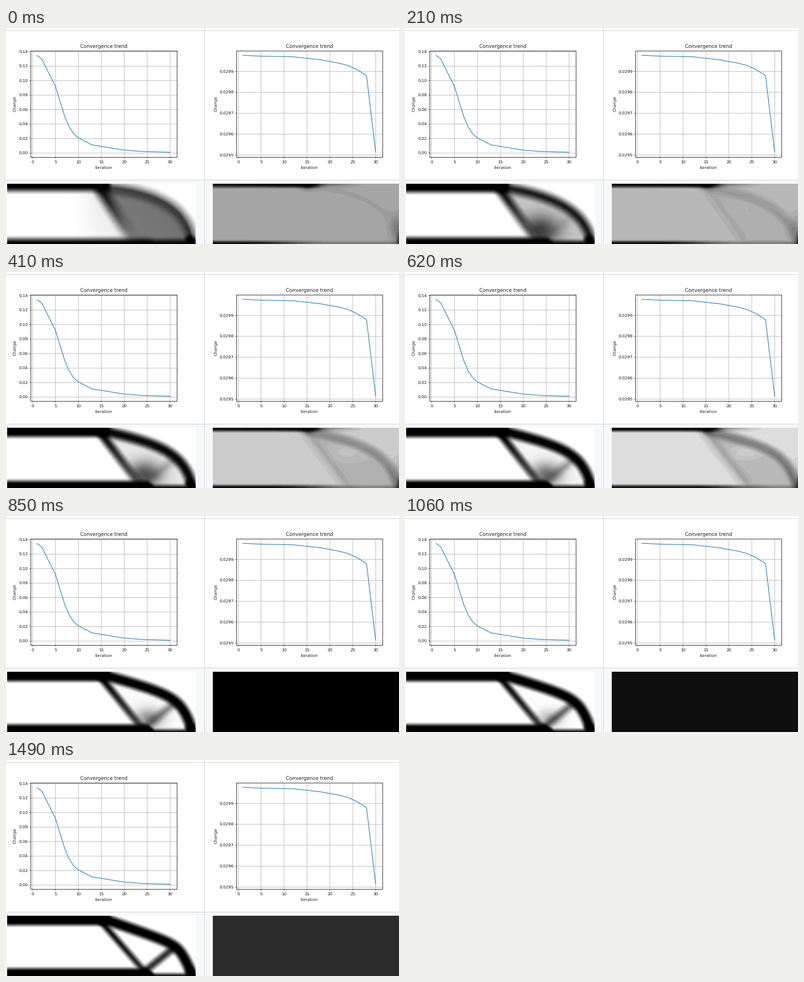
Animation of 688x380 px, one loop 1.59 s. Source, as a matplotlib script:

```python
import numpy as np
import matplotlib.pyplot as plt
from matplotlib.animation import FuncAnimation
from matplotlib.collections import LineCollection
from matplotlib.patches import Rectangle

W, H, DPI = 688, 380, 64
LOOP, STEP = 1590, 10
STARTS = [0, 210, 410, 620, 850, 1060, 1280, 1490]
LAST = len(STARTS) - 1
PX = 72 / DPI  # points per pixel

plt.rcParams["font.family"] = "DejaVu Sans"
plt.rcParams["text.hinting"] = "none"

fig = plt.figure(figsize=(W / DPI, H / DPI), dpi=DPI, facecolor="white")
ax = fig.add_axes([0, 0, 1, 1])
ax.axis("off")


# ---------- charts ----------
def segments(lines, color, width=1.0, z=2):
    ax.add_collection(LineCollection(lines, colors=color, linewidths=width * PX,
                                     zorder=z, snap=False))


def label(x, y, text, size=7.2, **kw):
    kw = {"ha": "center", "va": "baseline", **kw}
    ax.text(x, y, text, fontsize=size * PX, color="#1c1c1c", zorder=5, **kw)


def chart(left, name_x, y_ticks, y_fmt, y_px, keys):
    top, right, bottom = 40.5, left + 256, 227.5
    x_px = lambda i: left + 2.95 + 8.025 * i
    grid, ticks = [], []
    for i in range(0, 31, 5):
        x = x_px(i)
        grid.append([(x, top), (x, bottom)])
        ticks.append([(x, bottom), (x, bottom + 2.5)])
        label(x, 238, str(i))
    for v in y_ticks:
        y = y_px(v)
        grid.append([(left, y), (right, y)])
        ticks.append([(left - 2.5, y), (left, y)])
        label(left - 4.9, y + 2.2, y_fmt.format(v), ha="right")
    segments(grid, "#c0c0c0")
    segments(ticks, "#505050", 0.8, 4)
    frame = [(left, top), (right, top), (right, bottom), (left, bottom), (left, top)]
    segments([frame], "#404040", 1, 4)
    its = np.arange(1, 31)
    ax.plot(x_px(its), y_px(np.interp(its, *zip(*keys))), color="#1f77b4",
            lw=1.05 * PX, zorder=3)
    label(left + 127.5, 35.6, "Convergence trend", 8.6)
    label(left + 127.5, 248, "Iteration")
    label(name_x, 133.5, "Change", rotation=90, va="center")


ax.add_patch(Rectangle((0, 267), W, H - 267, fc="#f6f8fa", ec="none", zorder=0))
segments([[(0, 4.5), (W, 4.5)], [(0, 267.5), (W, 267.5)], [(347.5, 0), (347.5, H)]],
         "#d0d7de", z=1)

# Both plots show a change per iteration; the second is an offset from 0.0299 in 1e-6.
chart(43.5, 15.4, np.arange(0, .15, .02), "{:.2f}", lambda v: 220.1 - 1275 * v,
      [(1, .1347), (2, .130), (5, .092), (7, .051), (8, .036), (9, .0265),
       (10, .021), (13, .0113), (20, .0042), (24, .0022), (30, .0012)])
chart(403.5, 367, np.arange(-400, 1, 100), "{}", lambda v: 76.4 - .368 * v,
      [(1, 77), (5, 73), (12, 70), (18, 55.5), (22, 39.5), (24, 28),
       (26, 8), (28, -20), (30, -386)])
for text in ax.texts:
    if text.get_ha() == "right" and text.get_position()[0] > 360:
        text.set_text(f"{.0299 + int(text.get_text()) * 1e-6:.4f}")

# ---------- density fields ----------
X, Y = np.meshgrid(np.arange(2, 332) + .5, np.arange(274, 380) + .5)


def lerp(a, b, t):
    return a + (b - a) * t


def edge(v):
    """Smooth 0..1 ramp of compact width around v = 0."""
    t = np.clip(.5 + v / 6, 0, 1)
    return t * t * (3 - 2 * t)


def stroke(points, width, soft):
    dist = np.full(X.shape, 1e9)
    for (px, py), (qx, qy) in zip(points[:-1], points[1:]):
        dx, dy = qx - px, qy - py
        t = np.clip(((X - px) * dx + (Y - py) * dy) / (dx * dx + dy * dy), 0, 1)
        dist = np.minimum(dist, np.hypot(X - px - t * dx, Y - py - t * dy))
    return edge((width - dist) / soft)


def blob(cx, cy, sx, sy):
    return np.exp(-((X - cx) / sx) ** 2 - ((Y - cy) / sy) ** 2)


def pace(k):
    """Progress of an iteration: fast sharpening and slower reshaping."""
    return 1 - np.exp(-.8 * k), np.sqrt(k / LAST)


def arc_points(k):
    """Outer beam: a conic whose bend tightens into a corner."""
    _, shape = pace(k)
    t = np.linspace(0, 1, 25)
    weight = 1 + 3 * shape ** 3
    a, b, c = (1 - t) ** 2, 2 * weight * t * (1 - t), t ** 2
    x = a * 172 + b * lerp(318, 303, shape) + c * 327
    y = a * 280 + b * lerp(292, 325, shape) + c * 380
    return np.column_stack([x, y]) / (a + b + c)[:, None]


def brace_points(k):
    return [(167, 285), (lerp(218, 240, pace(k)[1]), 369)]


def inside(k, soft):
    """Area between the first brace and the outer beam."""
    arc = arc_points(k)
    (x0, y0), (x1, y1) = brace_points(k)
    brace_x = x0 + (x1 - x0) * (Y - y0) / (y1 - y0)
    return edge((X - brace_x) / soft) * edge((Y - np.interp(X, arc[:, 0], arc[:, 1])) / 3)


def overlay(layers):
    return 255 * np.prod([1 - np.clip(layer, 0, 1) for layer in layers], axis=0)


def density(k):
    sharp, shape = pace(k)
    soft = lerp(2.6, 1.7, sharp)
    roof = lerp(286.5, 290.8, sharp)
    floor = lerp(371, 366.5, sharp) + lerp(2, 9.5, sharp) * edge((X - 254) / 3)
    fade = np.clip((Y - 285) / 84, 0, 1)
    glow = blob(lerp(222, 260, shape), 356, lerp(44, 18, shape), lerp(36, 12, shape))
    return overlay([
        edge((roof - Y) / soft) * edge((182 - X) / 2),
        edge((Y - floor) / soft),
        stroke(arc_points(k), lerp(6.5, 9, sharp), lerp(4.5, 1.9, sharp))
        * lerp(.8, 1, sharp),
        stroke(brace_points(k), lerp(9, 5, shape), lerp(4, 1.9, sharp))
        * lerp(1, lerp(.25, .85, shape), fade),
        stroke([(245, 370), (292, 332)], 6, lerp(5, 2, shape)) * .8 * k / LAST,
        stroke([(322, 372), (328, 382)], 7, 2),
        inside(k, lerp(7, 3, sharp))
        * (lerp(.48, 0, sharp) + .58 * np.sin(np.pi * shape) * glow),
        .16 * (1 - sharp) ** 4 * edge((X - 134) / 11) * inside(k, 60),
    ])


def sensitivity(k):
    if k > 3:
        return np.full(X.shape, 15.0 * (k - 4))
    back = 165 + 56 * k / 3
    power = lerp(lerp(.78, 1, k / 3), 1, np.clip((X - 2) / 150, 0, 1))
    light_spot = 1 - .6 * blob(238, 317, 30, 14)
    field = overlay([
        edge((279.8 - Y) / 1.4) * power * edge((188 - X) / 6),
        edge((278 - Y) / 2) * .4 * edge((235 - X) / 14),
        edge((Y - 375.5) / 1.2) * .9 * edge((130 + 30 * k - X) / 26),
        edge((Y - 376) / 1.5) * .3,
        blob(331, 374, 6, 13) * .95,
        blob(326, 352, 13, 22) * lerp(.25, .08, k / 3),
        blob(168, 275, 14, 7) * .9,
        stroke(arc_points(k), 8, 2.2) * (.03 + .11 * k),
        inside(k, 2) * .06 * k * light_spot,
        stroke(brace_points(k), 9, 2.5) * .04 * k,
    ]) * back / 255
    return np.clip(back - 9 * np.round((back - field) / 9), 0, 255)


LEFT = [density(k) for k in range(LAST + 1)]
RIGHT = [sensitivity(k)[:, :326] for k in range(LAST + 1)]


def panel(field, x0):
    return ax.imshow(field, extent=(x0, x0 + field.shape[1], 380, 274), cmap="gray",
                     vmin=0, vmax=255, interpolation="nearest", aspect="auto", zorder=2)


left_image = panel(LEFT[0], 2)
right_image = panel(RIGHT[0], 362)
ax.set_xlim(0, W)
ax.set_ylim(H, 0)


def update(frame):
    k = np.searchsorted(STARTS, frame * STEP, side="right") - 1
    left_image.set_data(LEFT[k])
    right_image.set_data(RIGHT[k])
    return left_image, right_image


anim = FuncAnimation(fig, update, frames=LOOP // STEP, interval=STEP,
                     repeat=True, repeat_delay=0, blit=False)
plt.show()
```
